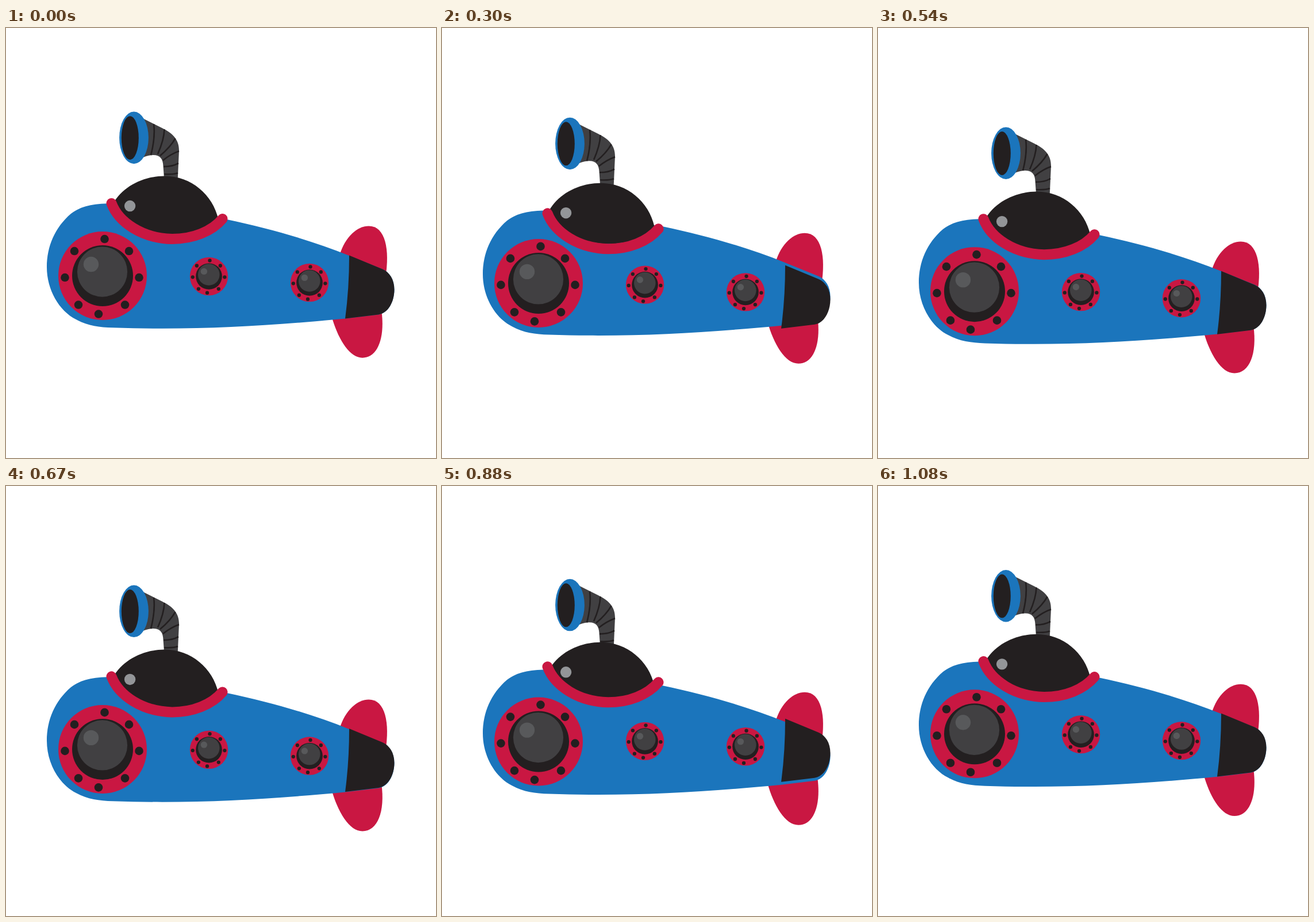
An HTML page that plays this animation: 748 by 748 pixels, repeating every 1.11 s.

```html
<!DOCTYPE html>
<html lang="en">
<head>
<meta charset="utf-8">
<title>Submarine</title>
<style>
  html, body { margin: 0; width: 100%; height: 100%; overflow: hidden; background: #fff; }
  svg { display: block; width: 100%; height: 100%; }
  .blue { fill: #1b75bc; }
  .red { fill: #c91742; }
  .black { fill: #231f20; }
  .grey { fill: #414042; }
  .line { fill: none; stroke: #231f20; stroke-width: 2.6; }
  .collar { fill: none; stroke: #c91742; stroke-width: 18; stroke-linecap: round; }
</style>
</head>
<body>
<!-- data-lag: how many ms a part trails the bobbing motion -->
<svg viewBox="0 0 748 748">
  <defs>
    <g id="port">
      <circle class="red" r="77"/>
      <circle class="black" r="53"/>
      <circle class="grey" cx="-.5" cy="-7" r="43.6"/>
      <circle fill="#58595b" cx="-20" cy="-20" r="13.2"/>
      <g id="bolts" class="black"></g>
    </g>
  </defs>
  <g data-lag="50">
    <path class="red" d="M566 500C577 540 597 573.5 620 573.5C646 573.5 660 540 653 490Z"/>
    <path class="grey" d="M238 157L272 174C292 184 301 195 301 213L298.5 268H275.5L273.5 240C273 222 262 216 238 225Z"/>
    <path class="line" d="M257 167Q260 190 252 221M275.5 176Q275 194 264 219M294.5 192Q286 207 268 222M301 214Q287 219 273 230M300 235Q290 241 274 241M299 252Q290 255 275 254"/>
    <ellipse class="blue" cx="222.5" cy="190.7" rx="25.4" ry="45.3"/>
    <ellipse class="black" cx="215.8" cy="191" rx="15" ry="38"/>
  </g>
  <g data-lag="35">
    <path class="red" d="M580 396C590 362 612 344.5 631 344.5C660 344.5 668 385 660 435L590 420Z"/>
    <path class="blue" d="M183 305C150 306 132 309 113 323C85 347 71 380 71 416C71 455 92 492 122 507C142 518 162 520.5 186 521.3C330 526 450 518.5 590 505.5L648 498.5C665 496 675.5 476 675.5 455C675.5 437 667 425 655 419.5L597 396C530 369 460 349 384 333Z"/>
    <path class="black" d="M186 306C203 275 240 257.5 276 257.5C322 257.5 360 290 369.5 333C352 350 335 356 322 360Q290 366 258 360C220 355 195 330 186 306Z"/>
    <circle fill="#939598" cx="215.6" cy="309.5" r="9.7"/>
  </g>
  <g data-lag="-3">
    <path class="collar" d="M183.5 305C196 338 237 366 289 367C325 367 358 354 376.5 332"/>
    <path class="black" d="M597 395.5L655 419.5C667 425 675.5 437 675.5 455C675.5 476 665 496 648 498.5L590 505.5Q597 453 597 395.5Z"/>
  </g>
  <g data-lag="30"><use href="#port" transform="translate(168 431)"/></g>
  <g data-lag="18"><use href="#port" transform="translate(353 432) scale(.431)"/></g>
  <g data-lag="5"><use href="#port" transform="translate(528 443) scale(.431)"/></g>
</svg>
<script>
const LOOP = 1110, STEPS = 33, HALF = 555, TURN = 567, DEPTH = 27.2;
const bolts = [[3.5, -64], [46, -43], [63.5, 3], [39, 50.5], [-7, 66.5], [-42, 50.5], [-65.5, 3], [-49, -43]];
document.getElementById('bolts').innerHTML =
  bolts.map(([x, y]) => `<circle cx="${x}" cy="${y}" r="7.3"/>`).join('');

const parts = [...document.querySelectorAll('[data-lag]')];
const ease = u => u >= 1 ? 1 : u < .5 ? 4 * u ** 3 : 1 - 4 * (1 - u) ** 3;

function sink(ms) {
  const p = (ms + LOOP) % LOOP;
  return DEPTH * (p < TURN ? ease(p / HALF) : 1 - ease((p - TURN) / HALF));
}

function draw() {
  const step = LOOP / STEPS;
  const i = Math.min(STEPS - 1, Math.floor((performance.now() % LOOP + 5) / step));
  for (const part of parts)
    part.setAttribute('transform', `translate(0 ${sink(i * step - part.dataset.lag).toFixed(2)})`);
  requestAnimationFrame(draw);
}
draw();
</script>
</body>
</html>
```
